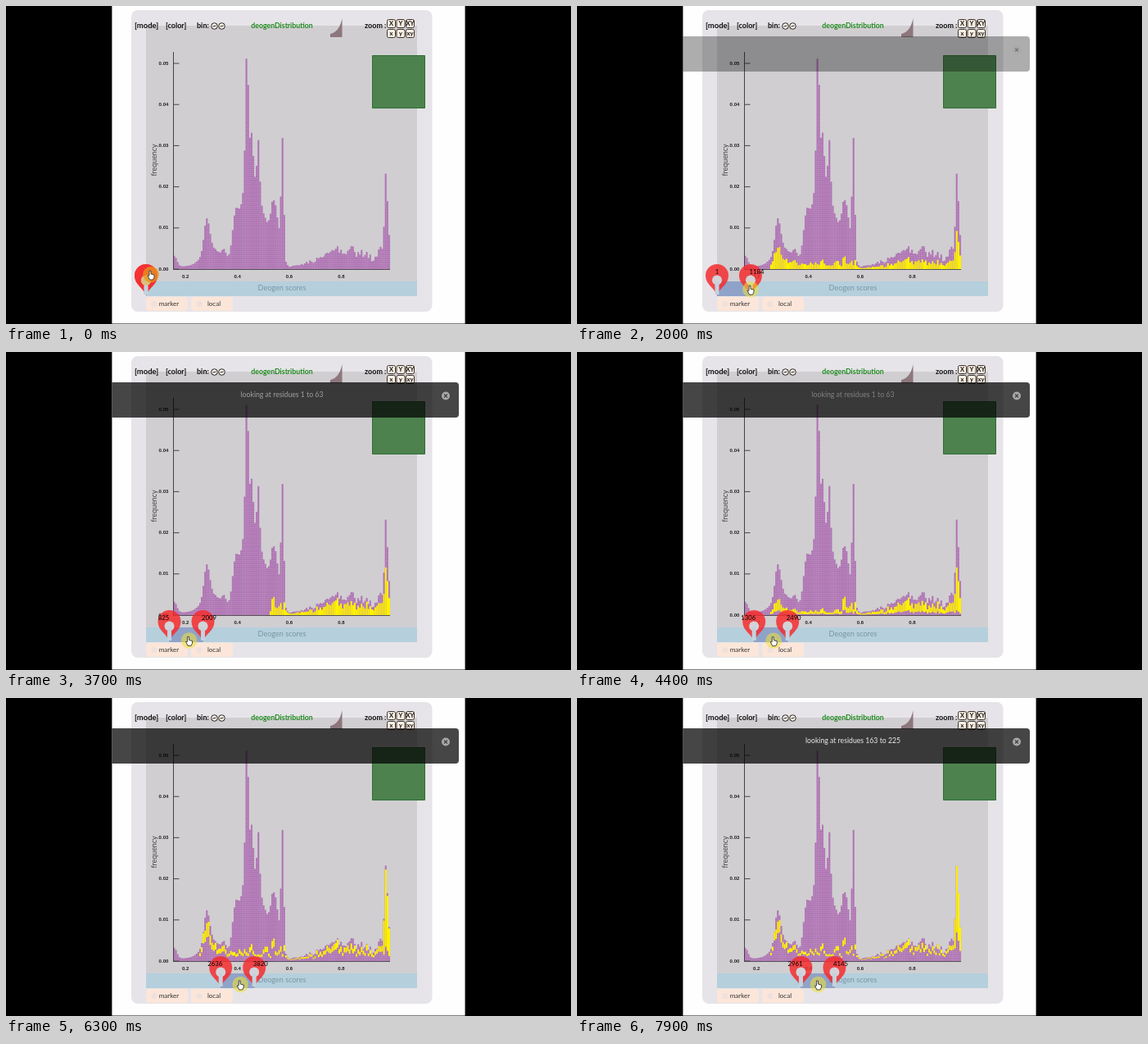
These frames come from a looping animation (690x388 px, 8 s). An HTML page with a canvas:

```html
<!DOCTYPE html>
<html lang="en">
<head>
<meta charset="utf-8">
<title>deogenDistribution</title>
<style>
html, body { margin: 0; height: 100%; overflow: hidden; background: #000; }
canvas { display: block; }
</style>
</head>
<body>
<canvas id="stage" width="690" height="388"></canvas>
<script>
const ctx = document.getElementById('stage').getContext('2d');
const LOOP = 8000, BASE = 321, LEFT = 204.5, STEP = 2.1, BARS = 126;

// Piecewise linear lookup in rows of [time, value, value...]
function at(rows, t, col = 1) {
  const next = rows.findIndex(row => row[0] >= t);
  if (next < 0) return rows[rows.length - 1][col];
  if (next === 0) return rows[0][col];
  const a = rows[next - 1], b = rows[next];
  return a[col] + (b[col] - a[col]) * (t - a[0]) / (b[0] - a[0]);
}
const noise = n => { const s = Math.sin(n * 127.1 + 11.7) * 43758.5453; return s - Math.floor(s); };

// The distribution is a sum of bell curves: [bar, height, width]
const bells = [[0, 13, 1.5], [19, 40, 1.6], [22, 22, 5.5], [29, 10, 1.2], [35.5, 40, 1.6], [44, 120, 5],
  [42.3, 153, 0.8], [45, 45, 0.8], [49, 62, 0.7], [54, 36, 4], [57.8, 50, 1.6], [60.5, 30, 1.5],
  [63, 146, 0.75], [100, 20, 13], [120, 14, 1.2], [123.1, 78, 0.7], [124, 42, 1.5]];
const heights = Array.from({ length: BARS }, (_, i) => {
  const sum = bells.reduce((h, [c, peak, w]) => h + peak * Math.exp(-((i - c) ** 2) / (2 * w * w)), 3);
  const rough = i > 65 && i < 121 ? 0.6 : 0.04;
  return sum * (1 + (noise(i) - 0.5) * rough);
});

// Selected share of the bars: [time, bottom, top, visibility of low scores, last peak bottom, last peak top]
const share = [[400, 0, 0, 1, 0, 0], [1900, 0, 0.42, 1, 0, 0.4], [2700, 0, 0.42, 1, 0, 0.4],
  [3700, 0, 0.6, 0, 0, 0.5], [5100, 0.35, 0.62, 1, 0.1, 0.5], [6300, 0.47, 0.75, 1, 0.15, 0.96],
  [7200, 0.55, 0.78, 1, 0.3, 1]];

function selection(i, t) {
  const h = heights[i];
  if (i < 15) return [0, 0];
  if (i > 121) return [h * at(share, t, 4), h * at(share, t, 5)];
  let stack = h;
  if (i > 30 && i < 66) stack = Math.min(h, Math.abs(i - 57.5) < 1 ? 44 : 8 + 14 * noise(i + 50));
  if (i < 56) stack *= at(share, t, 3);
  stack *= 1 + (noise(i + 300) - 0.5) * 0.6;
  return [Math.min(h, stack * at(share, t, 1)), Math.min(h, stack * at(share, t, 2))];
}

// Motion
const startId = [[2560, 0], [2700, 100], [3700, 825], [5100, 1787], [6300, 2636], [7200, 2961]];
const span = [[200, 0], [1900, 1184]];
const cursorOffset = [[200, 6], [1900, 41], [2000, 41], [2500, 24], [6300, 24], [7200, 21]];
const cursorY = [[200, 328], [1900, 345], [2500, 352], [5100, 353], [6300, 350]];
const barFade = [[1800, 0], [2250, 1]];
const messageFade = [[2100, 0], [2500, 0.9], [2700, 0.9], [3700, 0.52], [5100, 0.22], [6200, 0], [7600, 0], [7700, 0.9]];

// Drawing helpers
function paint(fill, stroke) {
  ctx.fillStyle = fill;
  ctx.fill();
  if (stroke) { ctx.strokeStyle = stroke; ctx.lineWidth = 1; ctx.stroke(); }
}
function rect(x, y, w, h, fill, r = 0, stroke) {
  ctx.beginPath();
  ctx.roundRect(x, y, w, h, r);
  paint(fill, stroke);
}
function disc(x, y, r, fill, stroke) {
  ctx.beginPath();
  ctx.arc(x, y, r, 0, 7);
  paint(fill, stroke);
}
function line(x1, y1, x2, y2, color, width = 1) {
  ctx.beginPath();
  ctx.moveTo(x1, y1);
  ctx.lineTo(x2, y2);
  ctx.strokeStyle = color;
  ctx.lineWidth = width;
  ctx.stroke();
}
function text(s, x, y, size, color, align = 'center', weight = 400, family = 'Lato') {
  ctx.font = `${weight} ${size}px ${family}, sans-serif`;
  ctx.textAlign = align;
  ctx.textBaseline = 'middle';
  ctx.fillStyle = color;
  ctx.fillText(s, x, y);
}
const tick = (s, x, y, align) => text(s, x, y, 6, '#222', align, 700, 'Liberation Sans');

function drawPanel() {
  rect(0, 0, 690, 388, '#000');
  rect(129.4, 0, 431.2, 387.4, '#fefefe');
  rect(153, 5, 367.5, 368, '#e6e4e8', 8);
  rect(171, 24, 331, 312, '#d0ced1');
  rect(171, 336, 331, 18, '#b5cfdd');
  text('Deogen scores', 337, 344.5, 9.1, '#7896a6');
  for (const [x, label] of [[171, 'marker'], [226, 'local']]) {
    rect(x, 355, 51, 17, '#fbe6d9', 3);
    disc(x + 10, 363.5, 3.5, '#efe0dc');
    text(label, x + 28, 363.5, 8, '#333');
  }
  const heading = (s, x, size) => text(s, x, 24.5, size, '#111', 'left', 700);
  heading('[mode]', 157, 9.5);
  heading('[color]', 195, 9);
  heading('bin:', 233, 9);
  heading('zoom :', 438, 9);
  text('deogenDistribution', 337, 24.5, 8.8, '#0a840a', 'center', 600);
  for (const x of [254.5, 263.5]) {
    disc(x, 24.5, 3.8, '#fdf3e6', '#222');
    line(x - 2, 25, x + 2, 24, '#222');
  }
  ctx.beginPath();
  ctx.moveTo(396, 38);
  ctx.lineTo(396, 34);
  ctx.quadraticCurveTo(407, 32, 410.5, 15);
  ctx.lineTo(410.5, 38);
  paint('#8c777c');
  ['X', 'Y', 'XY', 'x', 'y', 'xy'].forEach((s, i) => {
    const x = 465.5 + (i % 3) * 11.5, y = i < 3 ? 16.5 : 28.5;
    rect(x, y, 10, 10, '#fdf1e4', 2, '#3a302c');
    text(s, x + 5, y + 5, 7.5, '#111', 'center', 700);
  });
}

function drawChart(t) {
  heights.forEach((h, i) => {
    const x = LEFT + i * STEP;
    rect(x, BASE - h, STEP, h, '#bd93c0');
    rect(x, BASE - h, 1.6, h, '#ab6db0');
    for (let y = 2; y < h; y += 2.5) rect(x, BASE - y, STEP, 0.7, 'rgba(215,190,218,.3)');
    const [bottom, top] = selection(i, t);
    if (top - bottom > 0.3) rect(x, BASE - top, STEP, top - bottom, '#fff200');
  });
  line(204.5, 56, 204.5, 321.5, '#444');
  line(204, 321.5, 469, 321.5, '#555');
  ctx.save();
  ctx.translate(181, 188);
  ctx.rotate(-Math.PI / 2);
  text('frequency', 0, 0, 8.9, '#444');
  ctx.restore();
  for (let i = 0; i < 6; i++) {
    const y = BASE - i * 50.2;
    line(204, y, 211.5, y, '#444');
    tick((i / 100).toFixed(2), 198.3, y, 'right');
  }
  for (let i = 1; i < 5; i++) tick((i / 5).toFixed(1), 155.8 + i * 63.4, 330.5, 'center');
  rect(447.5, 60.5, 64, 64, '#4d824e', 0, '#2f6e32');
}

function drawPin(x) {
  ctx.beginPath();
  ctx.moveTo(x, 353);
  ctx.bezierCurveTo(x - 3, 344, x - 14, 340, x - 14, 329);
  ctx.arc(x, 329, 14, Math.PI, 0);
  ctx.bezierCurveTo(x + 14, 340, x + 3, 344, x, 353);
  paint('rgba(245,45,48,.85)');
  disc(x, 334.5, 6, '#d3d3d8');
  rect(x - 2.5, 336, 5, 16, '#c3d3de');
}

function drawCursor(x, y, glow) {
  disc(x, y - 0.5, 9.8, glow);
  ctx.beginPath();
  ctx.moveTo(x - 2, y - 5);
  ctx.lineTo(x, y - 5);
  ctx.lineTo(x, y - 1);
  ctx.lineTo(x + 4, y);
  ctx.lineTo(x + 4, y + 3);
  ctx.lineTo(x + 2.5, y + 6);
  ctx.lineTo(x - 1.5, y + 6);
  ctx.lineTo(x - 4, y + 1);
  ctx.lineTo(x - 2, y + 1);
  ctx.closePath();
  paint('#fff', '#444');
}

function drawRange(t) {
  const from = Math.round(at(startId, t)), to = from + Math.round(at(span, t));
  const xOf = id => 171 + id * 0.0346;
  const a = xOf(from), b = xOf(to);
  rect(a, 336, b - a, 18, 'rgba(75,85,165,.36)');
  drawPin(a);
  drawPin(b);
  if (to > 20) {
    text(Math.max(1, from), a - Math.min(7, from / 10), 324.5, 7.7, '#000');
    text(to, b + 7.5, 324.5, 7.7, '#000');
  }
  const onPin = t < 300;
  if (onPin) disc(a, 335, 6, '#d8c07c');
  drawCursor(a + at(cursorOffset, t), at(cursorY, t), onPin ? 'rgba(232,150,25,.75)' : 'rgba(240,225,50,.55)');
}

function drawMessage(t) {
  ctx.globalAlpha = at(barFade, t);
  rect(129.4, 37, 423.6, 43, 'rgba(0,0,0,.72)', [0, 4, 4, 0]);
  disc(537, 53.5, 5, '#a8a8a8');
  line(535, 51.5, 539, 55.5, '#444', 1.2);
  line(539, 51.5, 535, 55.5, '#444', 1.2);
  ctx.globalAlpha = at(messageFade, t);
  text(`looking at residues ${t < 7000 ? '1 to 63' : '163 to 225'}`, 337, 52, 8.7, '#fff');
  ctx.globalAlpha = 1;
}

function frame(now) {
  const t = Math.floor((now % LOOP) / 100) * 100;
  drawPanel();
  drawChart(t);
  drawRange(t);
  drawMessage(t);
  requestAnimationFrame(frame);
}
requestAnimationFrame(frame);
</script>
</body>
</html>
```
